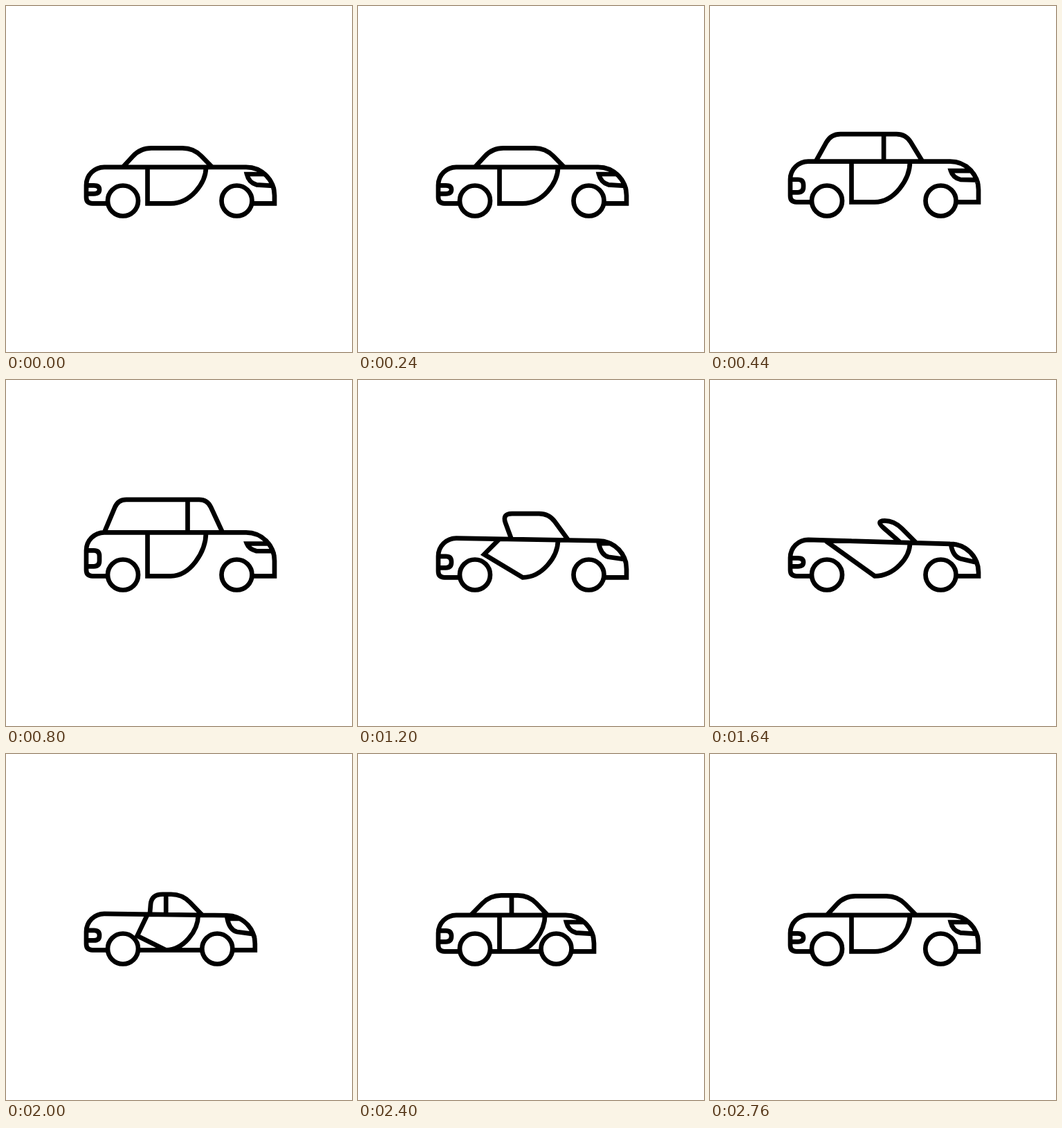
Recreate the animation shown at these times as an HTML page. Size 500 px wide and 500 px high, loop 2.78 s.

```html
<!DOCTYPE html>
<html>
<head>
<meta charset="utf-8">
<style>
html, body { margin: 0; height: 100%; overflow: hidden; background: #fff; }
svg { display: block; width: 100vw; height: 100vh; }
g { fill: none; stroke: #000; stroke-width: 6.7; stroke-miterlimit: 2; }
circle { fill: #fff; }
</style>
</head>
<body>
<svg viewBox="0 0 500 500">
  <g>
    <path id="car"/>
    <circle cx="169" cy="281.5" r="22"/>
    <circle id="front" cy="281.5" r="22"/>
  </g>
</svg>
<script>
const LOOP = 2780, STEP = 20, MORPH = 280;
const STARTS = [290, 1050, 1850, 2510];
const BACK = 116, NOSE = 388, FLOOR = 283, HOOD = 41, FENDER = 26, CUT = 47;

// Each model only names what sets it apart from the coupe.
const coupe = {
  belt: 230.5, slope: 0, cut: 0, tail: 257, lamp: .72, fold: 0,
  rearFoot: 169, rearTop: 194, frontTop: 271, frontFoot: 298,
  roof: 203, bend: 16, post: 234, glass: 0
};
const wagon = {
  ...coupe, belt: 220, tail: 246, lamp: .92,
  rearFoot: 142, rearTop: 162, frontTop: 291, frontFoot: 313,
  roof: 172.5, bend: 12, post: 262.5, glass: 1
};
const roadster = {
  ...coupe, slope: 6, lamp: .12, fold: 1,
  rearFoot: 275, rearTop: 239, frontTop: 266, post: 245
};
const hatch = {
  ...coupe, cut: CUT, tail: 253,
  rearFoot: 163, rearTop: 191, frontTop: 247, frontFoot: 274,
  roof: 202, post: 222, glass: 1
};
const models = [coupe, wagon, roadster, hatch, coupe];

const car = document.getElementById('car');
const front = document.getElementById('front');

const mix = (a, b, p) => a + (b - a) * p;
const ease = x => x < .5 ? 4 * x ** 3 : 1 - 4 * (1 - x) ** 3;

function shapeAt(t) {
  const i = Math.max(0, STARTS.findLastIndex(s => t >= s));
  const p = ease(Math.min(1, Math.max(0, (t - STARTS[i]) / MORPH)));
  const shape = {};
  for (const key in coupe) shape[key] = mix(models[i][key], models[i + 1][key], p);
  return shape;
}

// Open polyline whose inner corners are cut off by r and rounded
function rounded(points, r) {
  const toward = ([x, y], [u, v]) => {
    const k = Math.min(.5, r / Math.hypot(u - x, v - y));
    return [mix(x, u, k), mix(y, v, k)];
  };
  const last = points.length - 1;
  const corners = points.slice(1, last).map((c, i) =>
    `L${toward(c, points[i])}Q${c} ${toward(c, points[i + 2])}`);
  return `M${points[0]}${corners.join('')}L${points[last]}`;
}

function outline(s) {
  const nose = NOSE - s.cut, hood = nose - HOOD;
  const start = BACK + FENDER;
  const beltY = x => s.belt + s.slope * (x - start) / (hood - start);
  const onBelt = x => [x, beltY(x)];
  const hoodY = beltY(hood) + HOOD;
  const onHood = a => [hood + HOOD * Math.sin(a), hoodY - HOOD * Math.cos(a)];
  const bow = to => `A${HOOD} ${HOOD} 0 0 1 ${to}`;

  // in the short model both ends of the floor line meet between the wheels
  const sill = s.cut / CUT;
  const body = `M${150 + 140 * sill} ${FLOOR}H${BACK + 9}Q${BACK} ${FLOOR} ${BACK} ${FLOOR - 9}
    V${s.belt + FENDER}A${FENDER} ${FENDER} 0 0 1 ${start} ${s.belt}
    L${onBelt(hood)}${bow([nose, hoodY])}V${FLOOR}H${nose - 54 - 134 * sill}`;

  const low = 269, right = 135;
  const rear = rounded([[BACK, s.tail], [right, s.tail], [right, low], [BACK, low]], 8);

  const top = onHood(s.lamp), tip = onHood(1.22);
  const under = tip[1] - 7 * (.92 - s.lamp);
  const head = `M${hood + 1} ${top[1]}L${top}${bow(tip)}L${hood + 15} ${under}
    Q${hood + 4} ${under - 3} ${hood + 1} ${top[1]}Z`;

  const cabin = rounded([onBelt(s.rearFoot), [s.rearTop, s.roof],
    [s.frontTop, s.roof], onBelt(s.frontFoot)], s.bend);

  const hinge = 204.5, edge = 289 - .4 * s.cut, edgeY = beltY(edge);
  const sole = edge - 51 + .15 * s.cut;
  const corner = [hinge - 37 * s.fold, mix(FLOOR, beltY(hinge), s.fold)];
  const door = `M${onBelt(hinge)}L${corner}L${sole} ${FLOOR}
    C${mix(sole, edge, .55)} ${FLOOR} ${edge} ${mix(edgeY, FLOOR, .45)} ${edge} ${edgeY}`;

  const pillar = s.glass > .5 ? `M${s.post} ${s.roof}V${beltY(s.post)}` : '';
  return body + rear + head + cabin + door + pillar;
}

function draw(now) {
  const n = Math.floor(now % LOOP / STEP);
  const shape = shapeAt(n * STEP);
  // the body shakes on its wheels once every six steps
  const shake = 1 + 1.33 * Math.cos(n * Math.PI / 3);
  car.setAttribute('d', outline(shape));
  car.setAttribute('transform', `translate(0 ${shake})`);
  front.setAttribute('cx', 333.5 - shape.cut);
}

const begin = performance.now();
function tick() {
  draw(performance.now() - begin);
  requestAnimationFrame(tick);
}
tick();
</script>
</body>
</html>
```
